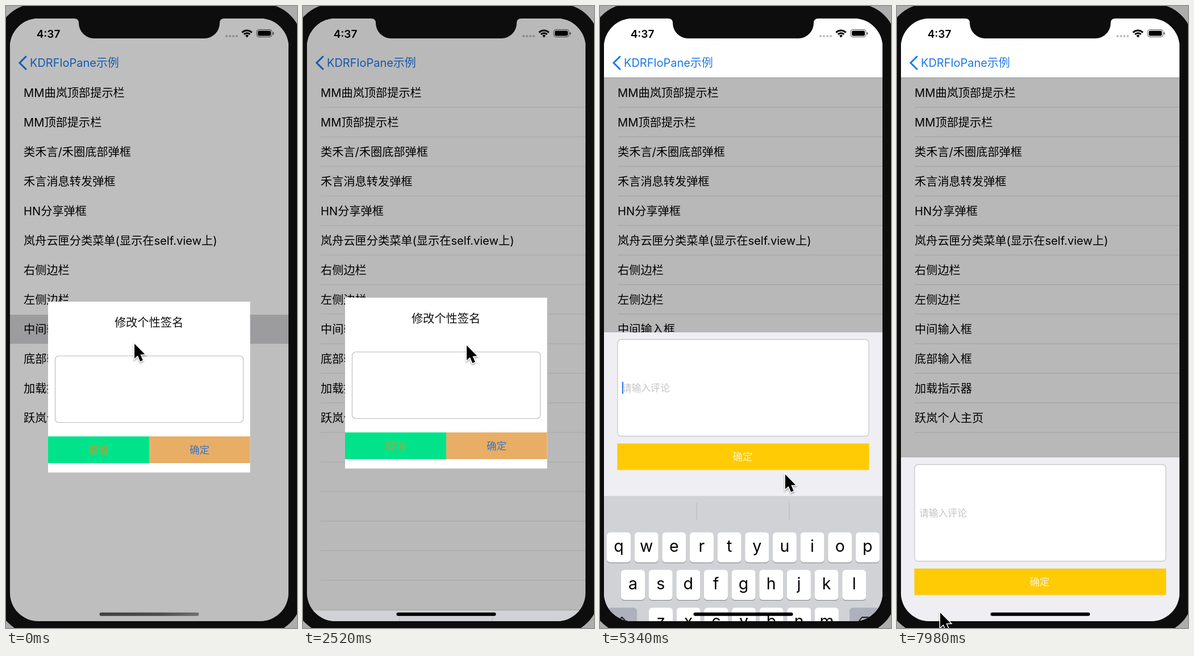
Write an HTML page with a canvas that moves like this. It is 512x1094 px and loops after 8000 ms.

```html
<!DOCTYPE html>
<html lang="zh-CN">
<head>
<meta charset="utf-8">
<title>Popup demo</title>
<style>
html, body { margin: 0; width: 100%; height: 100%; overflow: hidden; background: #adadad; }
canvas { display: block; width: 100%; height: 100%; }
</style>
</head>
<body>
<canvas id="stage" width="512" height="1094"></canvas>
<script>
const ctx = document.getElementById('stage').getContext('2d');
const FONT = 'Inter, "Noto Sans CJK SC", "Noto Sans CJK", "Noto Sans", sans-serif';
const LOOP = 8000, STEP = 60;
const SCREEN = { x: 7, y: 22, w: 490, h: 1060 };
const BOTTOM = SCREEN.y + SCREEN.h;
const NAV_BOTTOM = 126, ROW = 52, KEYBOARD = 410, DIM = 0.28;

const ROWS = [
  'MM曲岚顶部提示栏', 'MM顶部提示栏', '类禾言/禾圈底部弹框', '禾言消息转发弹框',
  'HN分享弹框', '岚舟云匣分类菜单(显示在self.view上)', '右侧边栏', '左侧边栏',
  '中间输入框', '底部输入框', '加载指示器', '跃岚个人主页'
];

// Pointer path: time, x, y
const PATH = [
  [0, 226, 594], [250, 235, 640], [400, 240, 655], [520, 240, 655],
  [1200, 241, 263], [1500, 290, 300], [1750, 200, 250], [2040, 288, 597],
  [2520, 288, 597], [3060, 300, 768], [3240, 300, 772], [3540, 291, 735],
  [4080, 302, 640], [4300, 305, 622], [4440, 305, 624], [4680, 386, 756],
  [5050, 330, 890], [5240, 330, 892], [5640, 287, 390], [6100, 200, 230],
  [6500, 245, 205], [6800, 190, 270], [7200, 270, 330], [7380, 270, 330],
  [7700, 250, 720], [7980, 76, 1067]
];

const clamp = v => Math.max(0, Math.min(1, v));
const ramp = (t, start, dur) => clamp((t - start) / dur);
const smooth = u => u * u * (3 - 2 * u);
const easeOut = u => 1 - (1 - u) ** 3;

function spring(t, start) {
  const x = Math.max(0, t - start) * 0.018;
  return 1 - (1 + x) * Math.exp(-x);
}

// Monotone cubic through the path, one axis at a time
function slope(i, axis) {
  if (i < 1 || i > PATH.length - 2) return 0;
  const [a, b, c] = [PATH[i - 1], PATH[i], PATH[i + 1]];
  const d1 = (b[axis] - a[axis]) / (b[0] - a[0]);
  const d2 = (c[axis] - b[axis]) / (c[0] - b[0]);
  return d1 * d2 <= 0 ? 0 : 2 * d1 * d2 / (d1 + d2);
}

function pathAt(t, axis) {
  let i = 0;
  while (i < PATH.length - 2 && t >= PATH[i + 1][0]) i++;
  const a = PATH[i], b = PATH[i + 1], span = b[0] - a[0];
  const u = clamp((t - a[0]) / span), k = smooth(u);
  return a[axis] * (1 - k) + b[axis] * k
    + span * u * (1 - u) * ((1 - u) * slope(i, axis) - u * slope(i + 1, axis));
}

function rect(x, y, w, h, fill) {
  ctx.fillStyle = fill;
  ctx.fillRect(x, y, w, h);
}

function box(x, y, w, h, r, fill, stroke, line = 1) {
  ctx.beginPath();
  ctx.roundRect(x, y, w, h, r);
  if (fill) { ctx.fillStyle = fill; ctx.fill(); }
  if (stroke) { ctx.strokeStyle = stroke; ctx.lineWidth = line; ctx.stroke(); }
}

function text(str, x, cy, size, color, align = 'left', weight = 400) {
  ctx.font = `${weight} ${size}px ${FONT}`;
  ctx.textAlign = align;
  ctx.textBaseline = 'alphabetic';
  ctx.fillStyle = color;
  ctx.fillText(str, x, cy + size * 0.37);
}

function stroke(points, color, width, close) {
  ctx.beginPath();
  points.forEach(([x, y]) => ctx.lineTo(x, y));
  if (close) ctx.closePath();
  ctx.strokeStyle = color;
  ctx.lineWidth = width;
  ctx.stroke();
}

function arc(x, y, r, from, to, color, width) {
  ctx.beginPath();
  ctx.arc(x, y, r, from, to);
  ctx.strokeStyle = color;
  ctx.lineWidth = width;
  ctx.stroke();
}

function dot(x, y, r, color) {
  ctx.beginPath();
  ctx.arc(x, y, r, 0, 7);
  ctx.fillStyle = color;
  ctx.fill();
}

function drawStatus() {
  text('4:37', 74.5, 48.5, 19, '#000', 'center', 600);
  for (let i = 0; i < 4; i++) dot(388 + i * 6, 53, 2.1, '#bcbcc0');
  const mid = -Math.PI / 2;
  ctx.lineCap = 'butt';
  for (const r of [12, 7.3]) arc(424, 55, r, mid - 0.8, mid + 0.8, '#000', 3);
  ctx.beginPath();
  ctx.moveTo(424, 55.5);
  ctx.arc(424, 55, 4, mid - 0.8, mid + 0.8);
  ctx.fillStyle = '#000';
  ctx.fill();
  box(441, 41.5, 27, 13, 4, null, '#555', 1);
  box(443, 43.5, 23, 9, 2.2, '#000');
  box(469.5, 46, 1.8, 4.5, 1, '#555');
}

function drawList(t) {
  const s = SCREEN;
  rect(s.x, s.y, s.w, s.h, '#fff');
  const first = 1 - ramp(t, 300, 240);
  const second = t < 4380 ? 0 : 1 - ramp(t, 4860, 240);
  if (first) rect(s.x, 543, s.w, 51, `rgba(209,209,213,${first})`);
  if (second) rect(s.x, 595, s.w, 51, `rgba(205,205,209,${second})`);

  let line = 0.12 * ramp(t, 300, 300);
  line += -0.06 * ramp(t, 3240, 300) + 0.1 * ramp(t, 4080, 360);
  const lineColor = `rgba(20,20,30,${line})`;
  for (let y = NAV_BOTTOM + ROW; y < BOTTOM; y += ROW) rect(31, y - 0.5, 466, 1, lineColor);
  ROWS.forEach((label, i) => text(label, 31, 152.3 + i * ROW, 20.2, '#000'));

  const tint = ramp(t, 3240, 240) * (1 - ramp(t, 3780, 900));
  rect(s.x, s.y, s.w, NAV_BOTTOM - s.y, '#fff');
  rect(s.x, s.y, s.w, NAV_BOTTOM - s.y, `rgba(242,241,247,${tint})`);
  rect(s.x, NAV_BOTTOM - 0.5, s.w, 1, `rgba(0,0,0,${0.27 * ramp(t, 4080, 360)})`);
  ctx.lineCap = 'round';
  stroke([[35, 89], [24, 100], [35, 111]], '#1b7af0', 3);
  text('KDRFloPane示例', 42, 100, 20, '#1b78e8');
  drawStatus();
}

function drawPopup(t, lift) {
  const out = smooth(ramp(t, 3240, 340));
  if (out >= 1) return;
  const x = Math.round(74 + 423 * out), y = Math.round(520 - lift * 159 / KEYBOARD);
  ctx.globalAlpha = 1 - 0.7 * out;
  rect(x, y, 355.5, 300.5, '#fff');
  text('修改个性签名', x + 177.5, y + 36.4, 20.2, '#111', 'center');
  box(x + 12.5, y + 95.5, 331, 117, 6, null, '#bcbcbc', 1.2);
  rect(x, y + 237, 178, 47, '#00e38a');
  rect(x + 178, y + 237, 177.5, 47, '#e8ae66');
  text('取消', x + 88.5, y + 260.4, 17.6, '#b2a236', 'center');
  text('确定', x + 266.5, y + 260.4, 17.6, '#3a74c4', 'center');
  ctx.globalAlpha = 1;
}

function drawPanel(t, lift) {
  if (t <= 4440) return;
  const y = Math.round(BOTTOM - 288 * easeOut(ramp(t, 4440, 390)) - lift);
  rect(SCREEN.x, y, SCREEN.w, BOTTOM - y, '#efeff3');
  box(31, y + 12.5, 442, 170, 6, '#fff', '#c9c9cd', 1.3);
  text('请输入评论', 39, y + 97.5, 16.8, '#c3c3c7');
  const focused = t >= 5240 && t < 7350;
  if (focused && (t - 5240) % 1000 < 560) rect(38.8, y + 87, 2.2, 21, '#3b7be0');
  box(30.5, y + 195.5, 443, 46.5, 0, '#ffcb05', '#eed98c');
  text('确定', 251, y + 219, 17.5, '#fdf3cf', 'center');
}

function key(x, y, w, label, gray) {
  box(x, y + 1.3, w, 53, 6, '#8c8e93');
  box(x, y, w, 53, 6, gray ? '#adb1bb' : '#fff');
  if (!label) return;
  if (label.length > 1) text(label, x + w / 2, y + 25.5, 19, '#000', 'center');
  else text(label, x + w / 2, y + 23.3, 28.5, '#000', 'center');
}

function drawKeyboard(lift) {
  if (lift < 0.5) return;
  const y = BOTTOM - lift;
  rect(SCREEN.x, y, SCREEN.w, KEYBOARD, '#d0d2d6');
  for (const x of [169.5, 332.5]) rect(x, y + 12, 1, 30, '#b4b6ba');
  const letters = [['qwertyuiop', 12, 64], ['asdfghjkl', 37, 130], ['zxcvbnm', 86, 196.5]];
  for (const [row, x, dy] of letters)
    [...row].forEach((c, i) => key(x + i * 48.65, y + dy, 42, c));

  key(12, y + 196.5, 53, '', true);
  key(439, y + 196.5, 53, '', true);
  key(12, y + 263, 116, '123', true);
  key(135, y + 263, 235.5, 'space');
  key(378, y + 263, 114, 'return', true);

  ctx.lineCap = ctx.lineJoin = 'round';
  const at = (dx, dy, pts) => pts.map(([px, py]) => [px + dx, py + dy]);
  stroke(at(38.5, y + 223, [[0, -10], [11, 1], [5.5, 1], [5.5, 10], [-5.5, 10], [-5.5, 1], [-11, 1]]), '#111', 1.8, true);
  stroke(at(466, y + 223, [[-13, 0], [-5, -9.5], [13, -9.5], [13, 9.5], [-5, 9.5]]), '#111', 1.8, true);
  stroke(at(469, y + 223, [[-4, -4], [4, 4]]), '#111', 1.8);
  stroke(at(469, y + 223, [[4, -4], [-4, 4]]), '#111', 1.8);

  const ink = '#50555c', cy = y + 362;
  arc(56, cy, 15, 0, 7, ink, 2.2);
  dot(51, cy - 5, 2.1, ink);
  dot(61, cy - 5, 2.1, ink);
  ctx.beginPath();
  ctx.arc(56, cy + 1.5, 9.5, 0, Math.PI);
  ctx.closePath();
  ctx.strokeStyle = ink;
  ctx.lineWidth = 2;
  ctx.stroke();
  stroke([[48, cy + 5], [64, cy + 5]], ink, 1.6);

  box(444, cy - 17, 10, 23, 5, null, ink, 2);
  arc(449, cy + 1, 10.5, 0, Math.PI, ink, 2);
  stroke([[438.5, cy - 4], [438.5, cy + 1]], ink, 2);
  stroke([[459.5, cy - 4], [459.5, cy + 1]], ink, 2);
  stroke([[449, cy + 12], [449, cy + 16]], ink, 2);
  stroke([[442, cy + 16], [456, cy + 16]], ink, 2);
}

function drawIndicator(t) {
  const gray = 1 - ramp(t, 240, 240) + (t < 4500 ? 0 : 1 - ramp(t, 4860, 240));
  const fade = ctx.createLinearGradient(165, 0, 340, 0);
  const shade = v => `rgb(${v * gray},${v * gray},${v * gray})`;
  fade.addColorStop(0, shade(64));
  fade.addColorStop(0.6, shade(76));
  fade.addColorStop(1, shade(112));
  box(164.5, 1066.7, 175, 6, 3, fade);
}

function drawNotch() {
  ctx.beginPath();
  ctx.moveTo(120, 20);
  ctx.lineTo(120, 22);
  ctx.quadraticCurveTo(128, 22, 128, 30);
  ctx.arcTo(128, 57, 155, 57, 27);
  ctx.arcTo(376, 57, 376, 30, 27);
  ctx.quadraticCurveTo(376, 22, 384, 22);
  ctx.lineTo(384, 20);
  ctx.closePath();
  ctx.fillStyle = '#0d0d0d';
  ctx.fill();
}

function drawPointer(x, y) {
  const shape = [[0, 0], [0, 26], [5.8, 20.7], [10.2, 31], [14.8, 29], [10.4, 19], [18.3, 18.6]];
  ctx.save();
  ctx.translate(x, y);
  ctx.lineJoin = 'miter';
  ctx.shadowColor = 'rgba(0,0,0,0.35)';
  ctx.shadowBlur = 3;
  ctx.shadowOffsetY = 2;
  stroke(shape, '#fff', 3, true);
  ctx.shadowColor = 'transparent';
  ctx.fillStyle = '#000';
  ctx.fill();
  ctx.restore();
}

function draw(t) {
  const s = SCREEN;
  const liftA = KEYBOARD * (spring(t, 400) - spring(t, 2250));
  const liftB = KEYBOARD * (spring(t, 5240) - spring(t, 7350));
  const dimA = (0.255 + 0.02 * ramp(t, 0, 180)) * (1 - smooth(ramp(t, 3240, 340)));
  const dimB = DIM * ramp(t, 4560, 325);

  rect(0, 0, 512, 1094, '#adadad');
  box(-17, -4, 538, 1109, 70, '#0d0d0d');

  ctx.save();
  ctx.beginPath();
  ctx.roundRect(s.x, s.y, s.w, s.h, 50);
  ctx.clip();
  drawList(t);
  rect(s.x, s.y, s.w, s.h, `rgba(0,0,0,${dimA})`);
  rect(s.x, NAV_BOTTOM, s.w, s.h, `rgba(0,0,0,${dimB})`);
  drawPopup(t, liftA);
  drawPanel(t, liftB);
  drawKeyboard(liftA + liftB);
  drawIndicator(t);
  ctx.restore();

  drawNotch();
  drawPointer(pathAt(t, 1), pathAt(t, 2));
}

const begin = performance.now();
function tick() {
  const t = (performance.now() - begin) % LOOP;
  draw(Math.floor(t / STEP) * STEP);
  requestAnimationFrame(tick);
}
tick();
</script>
</body>
</html>
```
